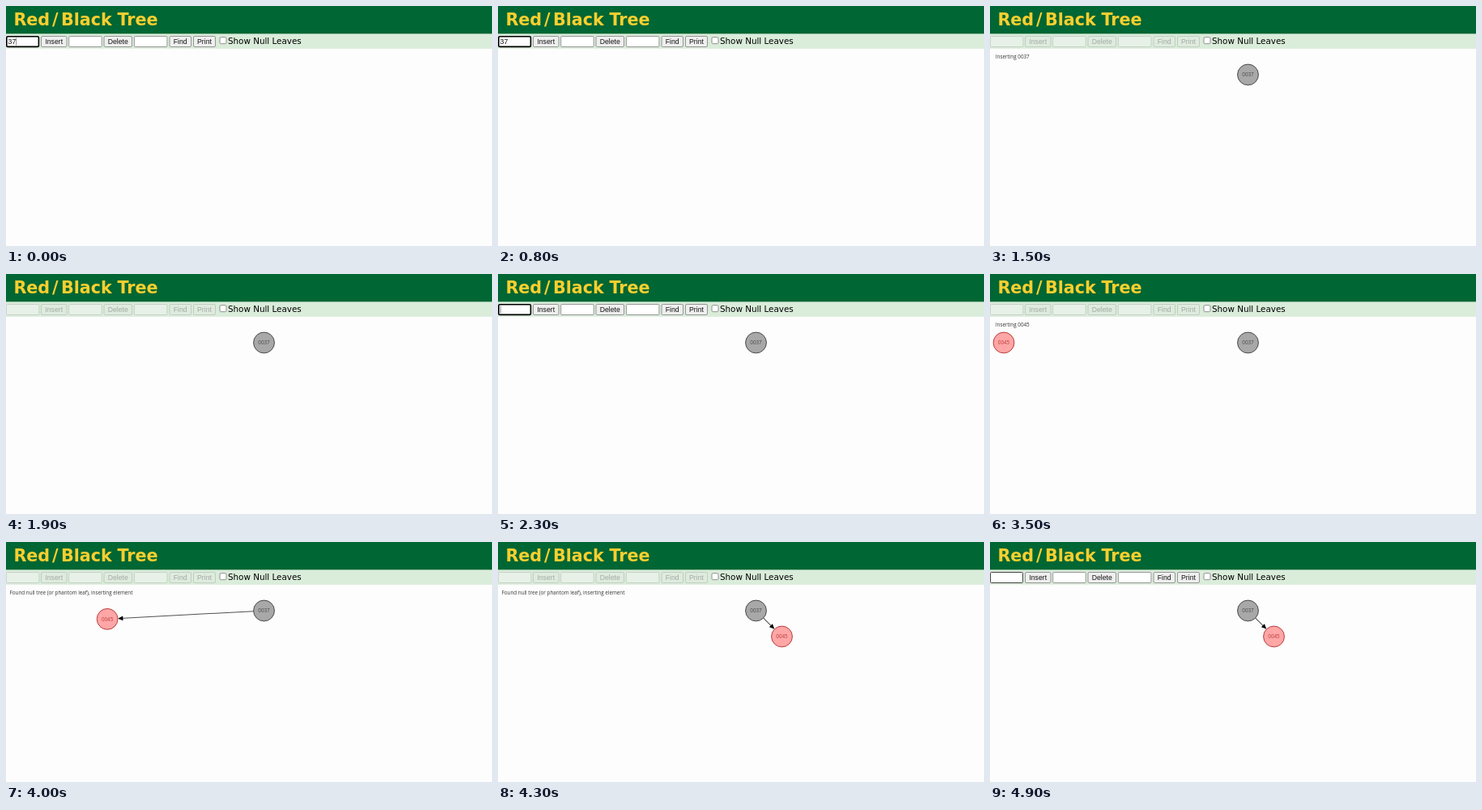
Recreate the animation shown at these times as an HTML page. Size 600 by 297 pixels, loop 5000 ms.

```html
<!DOCTYPE html>
<html lang="en">
<head>
<meta charset="utf-8">
<title>Red/Black Tree</title>
<style>
  html, body { margin: 0; width: 100%; height: 100%; overflow: hidden; background: #fdfdfd; }
  svg { display: block; width: 600px; height: 297px; }
  .title { font: bold 20.7px "DejaVu Sans", sans-serif; fill: #fbcf2f; }
  .label { font: 10.35px "DejaVu Sans", sans-serif; }
  .control { font: 8.7px "Liberation Sans", sans-serif; }
  .small { font: 6.3px "Open Sans", sans-serif; fill: #333; }
  .mid { text-anchor: middle; }
</style>
</head>
<body>
<svg viewBox="0 0 600 297"></svg>
<script>
const LOOP = 5000, STEP = 100;
const svg = document.querySelector('svg');
const root = { x: 318.5, y: 85 }, entry = { x: 17, y: 85 }, child = { x: 350.5, y: 117 };
const within = (t, from, to) => t >= from && t < to;
const lerp = (a, b, k) => a + (b - a) * k;

const rect = (x, y, w, h, fill, stroke = 'none', width = 1, rx = 0) =>
  `<rect x="${x}" y="${y}" width="${w}" height="${h}" rx="${rx}" fill="${fill}" stroke="${stroke}" stroke-width="${width}"/>`;
const text = (x, y, cls, str, fill) =>
  `<text x="${x}" y="${y}" class="${cls}"${fill ? ` style="fill:${fill}"` : ''}>${str}</text>`;

function button(x, w, name, off) {
  return rect(x, 37.5, w, 13, off ? '#dfebdf' : '#efefef', off ? '#b9c7b9' : '#818181', 0.8, 1.5) +
    text(x + w / 2, 47, 'control mid', name, off ? '#a2aba2' : '#111');
}

function field(x, off) {
  return rect(x, 37.5, 40.5, 13, off ? '#e7f1e7' : '#fff', off ? '#bfcbbf' : '#808080', 0.8, 1);
}

function entryField(t, off) {
  if (off) return field(0.4, true);
  const focused = t < 1500 || within(t, 2300, 3300);
  const typed = t < 1500 ? '37' : within(t, 2700, 2900) ? '4' : within(t, 2900, 3300) ? '45' : '';
  const caretOn = t < 600 || within(t, 1100, 1500) || within(t, 2300, 2600) || within(t, 2700, 3300);
  let out = focused
    ? rect(0.8, 37.8, 39.6, 12.6, '#fff', '#000', 1.6, 1.5)
    : rect(0.5, 37.5, 40, 13, '#fff', '#444', 1, 1);
  out += text(2.6, 47, 'control', typed, '#111');
  if (focused && caretOn) out += rect(2.8 + typed.length * 4.84, 39.5, 0.6, 9, '#444');
  return out;
}

function node(p, value, fill, ink, lit) {
  const ring = lit ? `<circle cx="${p.x}" cy="${p.y}" r="15" fill="#f00"/>` : '';
  return ring + `<circle cx="${p.x}" cy="${p.y}" r="12.9" fill="${fill}" stroke="${ink}"/>` +
    text(p.x, p.y + 2.2, 'small mid', value, ink);
}

function arrow(a, b) {
  const angle = Math.atan2(b.y - a.y, b.x - a.x) * 180 / Math.PI;
  const end = Math.hypot(b.x - a.x, b.y - a.y) - 13;
  return `<g transform="translate(${a.x} ${a.y}) rotate(${angle})">` +
    `<path d="M13 0H${end - 3}" stroke="#505050"/>` +
    `<path d="M${end} 0l-6.3 -2.8v5.6z"/></g>`;
}

function message(t) {
  if (within(t, 1500, 1900)) return [6.8, 'Inserting 0037'];
  if (within(t, 3300, 3600)) return [6.8, 'Inserting 0045'];
  if (within(t, 3600, 3900)) return [5, '0045 >= 0037. Looking at right subtree'];
  if (within(t, 3900, 4700)) return [4.5, 'Found null tree (or phantom leaf), inserting element'];
}

function scene(t) {
  const off = within(t, 1500, 2200) || within(t, 3300, 4900);
  const lit = within(t, 3600, 3900);
  let out = rect(0, 0, 600, 34.6, '#006633') + rect(0, 34.6, 600, 18.2, '#daecda') +
    text(9.4, 24, 'title', 'Red<tspan x="57">/</tspan><tspan x="68">Black</tspan><tspan x="137.4">Tree</tspan>') +
    entryField(t, off) + field(77.7, off) + field(158.4, off) +
    button(43.5, 31.5, 'Insert', off) + button(121, 34.5, 'Delete', off) +
    button(202, 26.5, 'Find', off) + button(231.5, 27, 'Print', off) +
    rect(264, 38.7, 8, 8, '#fff', '#767676', 0.8, 1.5) +
    text(274, 47, 'label', 'Show Null Leaves');

  const note = message(t);
  if (note) out += text(note[0], 64.5, 'small', note[1]);

  if (t >= 3300) {
    const k = Math.min(1, Math.max(0, (t - 3894) / 327));
    const pos = { x: lerp(entry.x, child.x, k), y: lerp(entry.y, child.y, k) };
    if (t >= 3900) out += arrow(root, pos);
    out += node(pos, '0045', '#ffa6a6', '#b83c3c', lit);
  }
  if (t >= 1500) out += node(root, '0037', '#a8a8a8', '#484848', lit);
  return out;
}

let shown = -1;
function tick() {
  const t = Math.floor(performance.now() % LOOP / STEP) * STEP;
  if (t !== shown) svg.innerHTML = scene(shown = t);
  requestAnimationFrame(tick);
}
tick();
</script>
</body>
</html>
```
